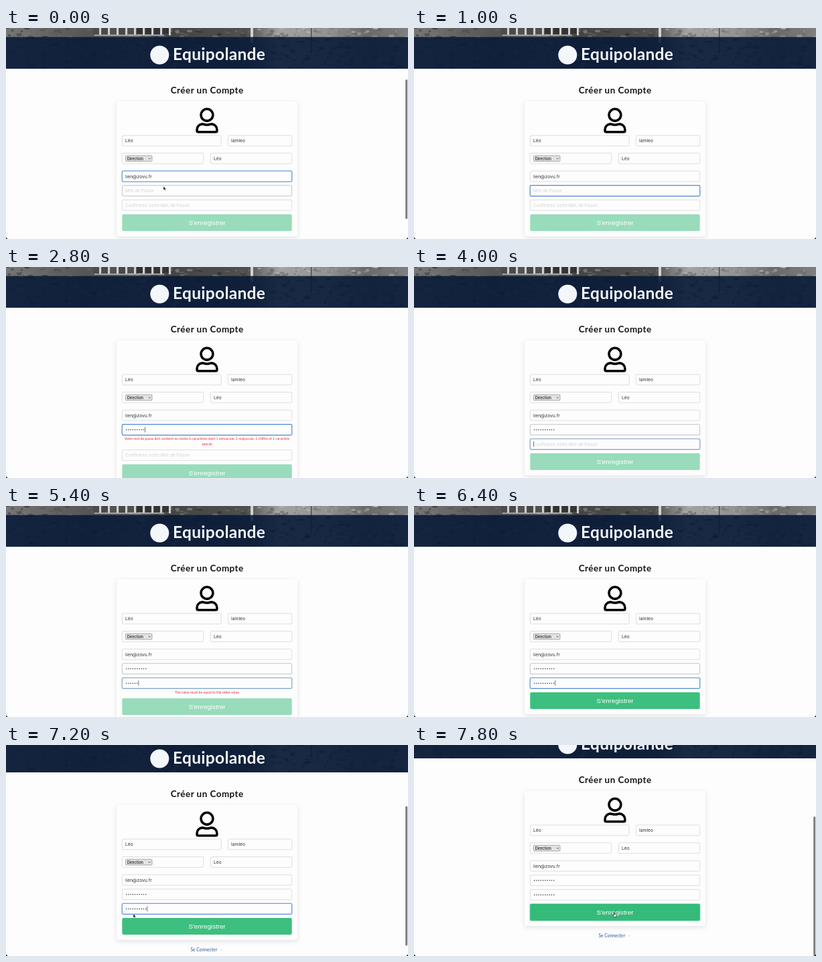
An HTML page that plays this animation: 600x316 px, repeating every 8000 ms.

```html
<!DOCTYPE html>
<html lang="fr">
<head>
<meta charset="utf-8">
<title>Créer un Compte</title>
<style>
html, body { margin: 0; width: 100%; height: 100%; overflow: hidden; background: #fdfdfd; }
svg { display: block; width: 600px; height: 316px; }
text { font: 6.7px Inter, "Open Sans", sans-serif; fill: #2c3036; }
.mid { text-anchor: middle; }
.brand { font: 700 24.5px Lato, sans-serif; letter-spacing: .3px; fill: #f4f7fa; }
.title { font: 700 13.4px Lato, sans-serif; letter-spacing: .5px; fill: #101418; }
.hint { fill: #cfd3d8; }
.pick { font-size: 5.6px; font-weight: 500; fill: #111; }
.error { font: 5.15px Lato, sans-serif; fill: #dc3545; }
.send { font: 9.8px "Liberation Sans", Arial, sans-serif; fill: #fff; }
.link { font: 6.7px Lato, sans-serif; fill: #31589c; }
.card { fill: #fdfdfd; filter: drop-shadow(0 2px 3.5px rgba(0, 0, 0, .11)); }
.field { fill: #fdfdfd; stroke: #d3d6da; stroke-width: .8; }
.ring { fill: none; stroke-width: 1.15; }
</style>
</head>
<body>
<svg viewBox="0 0 600 316">
  <defs>
    <clipPath id="band"><rect width="600" height="61"/></clipPath>
    <linearGradient id="stone">
      <stop offset="0" stop-color="#777"/>
      <stop offset=".2" stop-color="#555"/>
      <stop offset=".34" stop-color="#666"/>
      <stop offset=".4" stop-color="#444"/>
      <stop offset=".6" stop-color="#505050"/>
      <stop offset=".68" stop-color="#a2a2a2"/>
      <stop offset=".8" stop-color="#929292"/>
      <stop offset=".9" stop-color="#6a6a6a"/>
      <stop offset="1" stop-color="#808080"/>
    </linearGradient>
  </defs>
  <g id="page">
    <g clip-path="url(#band)">
      <rect width="600" height="61" fill="url(#stone)"/>
      <g id="photo"></g>
      <rect y="13.5" width="600" height="48" fill="#071a38" opacity=".88"/>
    </g>
    <circle cx="229.3" cy="40.5" r="14" fill="#f4f7fa"/>
    <text class="brand" x="249" y="47.6">Equipolande</text>
    <text class="title mid" x="300.2" y="97.8">Créer un Compte</text>
    <rect id="card" class="card" x="165" y="110" width="270" height="202" rx="4"/>
    <g fill="none" stroke="#000" stroke-width="48" transform="translate(283.3 119.5) scale(.0743)">
      <circle cx="224" cy="144" r="120"/>
      <path d="M24 438C24 377 73 328 134 328c22 0 43 16 90 16s68-16 90-16C375 328 424 377 424 438V464a24 24 0 0 1-24 24H48a24 24 0 0 1-24-24Z"/>
    </g>
    <g id="fixed"></g>
    <g id="email"></g>
    <g id="pass"></g>
    <g id="passError">
      <text class="error mid" x="300" y="259.3">Votre mot de passe doit contenir au moins 6 caractères dont 1 minuscule, 1 majuscule, 1 chiffre et 1 caractère</text>
      <text class="error mid" x="300" y="266.8">spécial</text>
    </g>
    <g id="confirm"></g>
    <text id="confirmError" class="error mid" x="300" y="280.7">The value must be equal to the other value</text>
    <g id="send">
      <rect id="glow" x="172.4" y="278.3" width="255.2" height="26.4" rx="2.5" fill="#9be0bf"/>
      <rect id="fill" x="173.3" y="279" width="253.4" height="25" rx="2"/>
      <text class="send mid" x="300" y="295">S'enregistrer</text>
    </g>
    <text class="link" x="275.5" y="329.3">Se Connecter</text>
    <path d="M319.5 327h3m-1-.8l1 .8-1 .8" fill="none" stroke="#b9c6de" stroke-width=".5"/>
  </g>
  <rect id="bar" x="596.2" width="3" height="209" rx="1.5" fill="#7d7d7d"/>
  <path id="arrow" d="M0 0V5.6L1.3 4.4 2.2 6.4 3.1 6 2.2 4.1H4Z" fill="#000" stroke="#fff" stroke-width=".45"/>
  <path id="hand" d="M-.6 0q.6-.7 1.1 0V2.2L3 2.8q.7.3.5 1.2L2.9 6.6H-.4L-2.2 4.2q0-.9.8-.6l.8.6Z" fill="#fff" stroke="#000" stroke-width=".6"/>
  <path d="M0 312V316H4Q0 316 0 312ZM600 312V316H596Q600 316 600 312Z" fill="#000"/>
</svg>
<script>
const STEP = 200, LOOP = 8000;
const BLUE = '#5b8edb', SOFT = '#84a3cd';
const $ = id => document.getElementById(id);
const show = (id, on) => $(id).setAttribute('visibility', on ? 'visible' : 'hidden');
const move = (id, x, y) => $(id).setAttribute('transform', `translate(${x} ${y})`);

function add(parent, tag, attrs, text) {
  const el = document.createElementNS('http://www.w3.org/2000/svg', tag);
  for (const name in attrs) el.setAttribute(name, attrs[name]);
  if (text) el.textContent = text;
  parent.append(el);
  return el;
}

// A pale colonnade among dark trees, with open sky branches on the right.
function paintPhoto() {
  const photo = $('photo');
  let seed = 7;
  const rnd = () => (seed = seed * 16807 % 2147483647) / 2147483647;
  const box = (x, y, width, height, fill) => add(photo, 'rect', { x, y, width, height, fill });
  const grey = (low, span) => `hsl(0 0% ${low + rnd() * span}%)`;
  for (let i = 0; i < 650; i++) {
    const x = rnd() * 600, y = rnd() * 61, open = x > 375 && y < 14;
    add(photo, 'ellipse', {
      cx: x, cy: y, rx: 1 + rnd() * 4, ry: .6 + rnd() * 2,
      fill: open ? grey(35, 42) : grey(15, 42), opacity: .6
    });
  }
  for (let x = 130; x < 236; x += 13) {
    box(x, 0, 9, 9, grey(18, 16));
    box(x + 9, 0, 3, 11, '#d0d0d0');
  }
  box(132, 10, 104, 1.5, '#b5b5b5');
  box(365, 0, 4, 22, '#d2d2d2');
  box(455, 0, 1.2, 40, '#444');
}

function frame(g, x, y, width) {
  return add(g, 'rect', { class: 'field', x: x + .4, y: y + .4, width: width - .8, height: 15.8, rx: 1.6 });
}

function makeInput(id, y, hint) {
  const g = $(id), border = frame(g, 173, y, 254);
  const ring = add(g, 'rect', { class: 'ring', x: 173.2, y: y + .2, width: 253.6, height: 16.2, rx: 1.8 });
  const label = hint && add(g, 'text', { class: 'hint', x: 178, y: y + 10.6 }, hint);
  const dots = hint ? Array.from({ length: 10 }, (_, i) =>
    add(g, 'circle', { cx: 179.7 + i * 3.22, cy: y + 8.4, r: .75, fill: '#23272b' })) : [];
  const caret = add(g, 'rect', { y: y + 4.2, width: .6, height: 8, fill: '#222' });
  return (count, color, blink, hover) => {
    ring.setAttribute('stroke', color || 'none');
    border.style.stroke = hover ? '#b0b4b9' : '';
    if (label) label.setAttribute('visibility', count ? 'hidden' : 'visible');
    dots.forEach((dot, i) => dot.setAttribute('visibility', i < count ? 'visible' : 'hidden'));
    caret.setAttribute('x', 178.3 + count * 3.22);
    caret.setAttribute('visibility', color && blink ? 'visible' : 'hidden');
  };
}

function makeFixed() {
  const g = $('fixed');
  const write = (x, y, text) => add(g, 'text', { x, y }, text);
  frame(g, 173, 160.5, 148.5);
  frame(g, 331, 160.5, 96);
  frame(g, 173, 187, 122);
  frame(g, 305, 187, 122);
  write(178, 171.2, 'Léo');
  write(336, 171.2, 'Iamleo');
  write(310, 197.8, 'Léo');
  add(g, 'rect', { x: 178.4, y: 191.2, width: 39.6, height: 8.6, rx: 1.2, fill: '#e3e3e3', stroke: '#888', 'stroke-width': .7 });
  add(g, 'text', { class: 'pick', x: 180.8, y: 197.5 }, 'Direction');
  add(g, 'path', { d: 'M212.8 194.8l1.5 1.5 1.5-1.5', fill: 'none', stroke: '#222', 'stroke-width': .7 });
}

paintPhoto();
makeFixed();
const email = makeInput('email', 213.8);
const pass = makeInput('pass', 235.4, 'Mot de Passe');
const confirmPass = makeInput('confirm', 257, 'Confirmez votre Mot de Passe');
add($('email'), 'text', { x: 178, y: 224.5 }, 'lien@zovu.fr');

const clamp = (v, a, b) => Math.max(a, Math.min(b, v));
const scrolls = [1, 6, 20, 33, 40, 41];
const route = [[215, 246], [186, 250], [172.7, 251.2], [190, 253], [235, 254], [278, 253], [299, 251]];

function draw(k) {
  const typed = clamp(k - 5, 0, 10);
  const again = clamp(k < 23 ? k - 20 : k - 21, 0, 10);
  const wrong = typed > 0 && typed < 10, differs = again > 0 && again < 10;
  const ready = again === 10, pressed = k === 39;
  const scroll = k < 34 ? 0 : scrolls[k - 34];
  const focus = k < 1 ? 'email' : k < 19 ? 'pass' : pressed ? 'send' : 'confirm';

  // The caret blinks from the last key or focus change.
  const since = k < 1 ? 3 : k < 6 ? k - 1 : k < 15 ? 0 : k < 19 ? k - 15 : k < 21 ? k - 19 : k < 31 ? 0 : k - 31;
  const blink = since % 5 < 3;
  email(0, focus === 'email' && BLUE, false);
  pass(typed, focus === 'pass' && BLUE, blink, k < 33);
  confirmPass(again, focus === 'confirm' && (ready ? BLUE : SOFT), blink);

  const shift = wrong ? 16.5 : 0, drop = shift + (differs ? 9 : 0);
  show('passError', wrong);
  show('confirmError', differs);
  move('confirm', 0, shift);
  move('send', 0, drop);
  $('card').setAttribute('height', 202 + drop);
  move('page', 0, -scroll);

  const [x, y] = k < 33 ? [235, 237.2] : route[k - 33];
  const over = k > 33 && x > 174 && y > 279 - scroll && y < 304 - scroll;
  const seen = k < 4 || k > 32;
  show('arrow', seen && !over);
  show('hand', seen && over);
  move('arrow', x, y);
  move('hand', x, y);
  show('glow', pressed);
  $('fill').setAttribute('fill', !ready ? '#98dcbb' : over ? '#34bb79' : '#3dbf7f');

  $('bar').setAttribute('y', 77 + scroll * .73);
  $('bar').setAttribute('opacity', k < 4 || k > 33 ? 1 : k === 4 ? .5 : 0);
}

let last = -1;
function tick(now) {
  const k = Math.floor(now % LOOP / STEP);
  if (k !== last) draw(last = k);
  requestAnimationFrame(tick);
}
draw(0);
requestAnimationFrame(tick);
</script>
</body>
</html>
```
